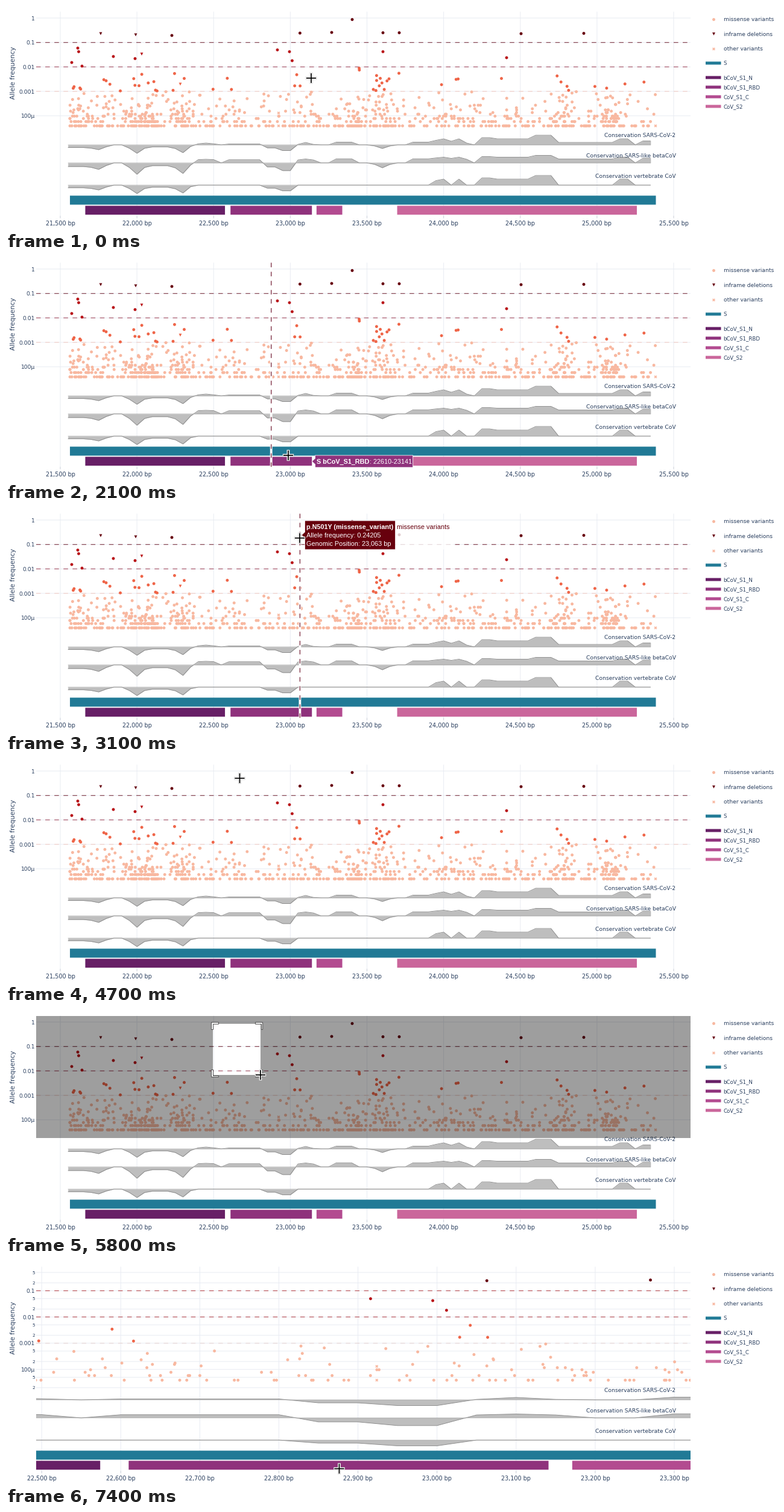
These frames come from a looping animation (1280 by 371 pixels, 8 s). A matplotlib script:

```python
import numpy as np
import matplotlib.pyplot as plt
from matplotlib.animation import FuncAnimation
from matplotlib.patches import PathPatch, Polygon, Rectangle
from matplotlib.path import Path

W, H, DPI = 1280, 371, 100
PT = 72 / DPI
LEFT, RIGHT, TOP, BOTTOM, FOOT = 50, 1135, 9.5, 212.5, 349
INK, GRID, TEAL = "#2a3f5f", "#e9ecf3", "#217a96"
DARK, RED, ORANGE, PALE = "#67000d", "#b91419", "#ef6548", "#f8b8a0"
UNIT = 1.937e-5  # frequency of a single observation


class View:
    """Maps base pairs and allele frequency to stage pixels."""

    def __init__(self, x0, bp0, scale, y1, decade):
        self.x0, self.bp0, self.scale = x0, bp0, scale
        self.y1, self.decade = y1, decade

    def x(self, bp):
        return self.x0 + (np.asarray(bp) - self.bp0) * self.scale

    def y(self, freq):
        return self.y1 - self.decade * np.log10(freq)

    def invert(self, pts):
        x, y = np.array(pts, float).T
        bp = self.bp0 + (x - self.x0) / self.scale
        return np.column_stack([bp, 10 ** ((self.y1 - y) / self.decade)])


WIDE = View(90, 21500, 0.25425, 20, 40.67)
NEAR = View(50, 22493, 1.311, 5.9, 43.6)

# ---------------------------------------------------------------- data
VARIANTS = {"N501T": (23064, .00167), "S494P": (23042, .0048),
            "E484K": (23012, .018), "N501Y": (23063, .24205)}
FREQUENT = WIDE.invert([
    (275, 49), (540, 44), (574, 22.5), (625, 44.5), (652, 44.5), (854, 46),
    (958, 45.5), (109, 94), (119, 70), (120.5, 76), (126, 100), (178, 84),
    (214, 87.5), (450, 73), (470, 76), (625, 76), (830, 86)])
DELETIONS = WIDE.invert([(157, 46), (215, 48), (225, 80), (289, 130)])
OTHERS = WIDE.invert([(452, 178), (452, 199.4), (830, 199.4), (1077, 199.4)])
HOT_SPOTS = WIDE.invert([(x, 0) for x in (117, 161, 218, 240, 293, 583, 622,
                                          928, 1000)])[:, 0]
GENE = (21563, 25384)
DOMAINS = [("bCoV_S1_N", 21663, 22574, "#671f66"),
           ("bCoV_S1_RBD", 22610, 23141, "#8f327c"),
           ("CoV_S1_C", 23171, 23339, "#b34b90"),
           ("CoV_S2", 23697, 25260, "#ca669b")]


def rare_variants(n=850):
    """Power-law counts, partly crowded around the hot spots."""
    rng = np.random.default_rng(11)
    counts = np.arange(2, 500)
    p = counts ** -1.7
    freq = UNIT * rng.choice(counts, n, p=p / p.sum())
    crowd = rng.choice(HOT_SPOTS, n) + rng.normal(0, 36, n)
    bp = np.where(rng.random(n) < .4, crowd, rng.uniform(*GENE, n))
    return np.column_stack([np.clip(bp, *GENE), freq])


MISSENSE = np.vstack([rare_variants(), FREQUENT, list(VARIANTS.values())])

# Flat-topped bumps in the shared profile: centre, half width, height
BUMPS = [(1, 2.5, -4.5), (4, 1.4, -8), (9, 1.4, -14), (12.5, 2.5, -3.5),
         (15, 1.2, -13), (18, 1.6, 3), (23, 3, 1.5), (26.5, 1.5, -5),
         (28.5, 1.5, -9.5), (31, 1.2, 4), (36, 2, 4.5), (41, 1.3, -6),
         (46.5, 2.5, 4.5), (49, 1.3, 10), (51, 1.3, 10), (54.5, 1.5, 12),
         (58, 3, 10), (62, 2, 16), (67.5, 4.5, 4), (72.5, 1.5, 10),
         (75.5, 1.5, 6.5)]
STEPS = np.arange(77)
PROFILE = sum(h * np.clip(w - abs(STEPS - c), 0, 1) for c, w, h in BUMPS)
TRACKS = [
    ("Conservation SARS-CoV-2", 214.5, 231, PROFILE),
    ("Conservation SARS-like betaCoV", 248.5, 261,
     np.where(PROFILE > .5, .5 * PROFILE + 4.5, 1.35 * PROFILE)),
    ("Conservation vertebrate CoV", 282.5, 298,
     np.where((PROFILE > 7) | ((PROFILE < 0) & (STEPS < 35)), PROFILE, 0)),
]

# ---------------------------------------------------------------- stage
fig = plt.figure(figsize=(W / DPI, H / DPI), dpi=DPI, facecolor="white")
ax = fig.add_axes([0, 0, 1, 1])
ax.set_xlim(0, W)
ax.set_ylim(H, 0)
ax.axis("off")
frame = Rectangle((LEFT, 0), RIGHT - LEFT, H, transform=ax.transData)


def text(x, y, s, size=9.2, z=5, **kw):
    kw = {"color": INK, "va": "center_baseline", "family": "DejaVu Sans", **kw}
    return ax.text(x, y, s, fontsize=size * PT, zorder=z, **kw)


def line(xs, ys, color, width=1.0, z=1, **kw):
    return ax.plot(xs, ys, color=color, lw=width * PT, zorder=z, snap=False,
                   solid_capstyle="butt", dash_capstyle="butt", **kw)[0]


def dashed(xs, ys, color, width, z):
    dash = 7.55 / width
    return line(xs, ys, color, width, z, ls=(0, (dash, dash)))


def rect(x0, y0, x1, y1, color, z=3, **kw):
    return ax.add_patch(Rectangle((x0, y0), x1 - x0, y1 - y0, fc=color, lw=0,
                                  zorder=z, snap=False, **kw))


def dots(x, y, colors, marker="o"):
    return ax.scatter(x, y, s=(4.9 * PT) ** 2, c=colors, marker=marker, lw=0,
                      zorder=4)


def shade(freq):
    return [DARK if f > .1 else RED if f > .01 else ORANGE if f > .001
            else PALE for f in freq]


def build(view, x_ticks, y_ticks, rules):
    """All artists of one zoom level."""
    art, labels = [], []
    for bp in x_ticks:
        x = view.x(bp)
        art.append(line([x, x], [TOP, FOOT], GRID))
        art.append(line([x, x], [FOOT, FOOT + 4], "#c9ced8"))
        labels.append(text(x, 361, f"{bp:,} bp", 9.6, ha="center"))
    for freq, name in y_ticks:
        y = view.y(freq)
        art.append(line([LEFT, RIGHT], [y, y], GRID))
        size = 7.4 if name in "25" else 9.2
        labels.append(text(48, y, name, size, ha="right"))
    for freq, color in zip((.1, .01, .001), rules):
        y = view.y(freq)
        art.append(dashed([LEFT, RIGHT], [y, y], color, 1.2, 2))

    x = view.x(21550 + 50 * STEPS)
    for _, _, base, heights in TRACKS:
        art.append(ax.fill_between(x, base, base - heights, color="#bebebe",
                                   lw=0, zorder=2))
        art.append(line(x, base - heights, "#8a8a8a", .9, 3))
        art.append(line(x[[0, -1]], [base, base], "#9a9a9a", .6, 3))
    a, b = view.x(GENE)
    art.append(rect(a, 315.5, b, 330.5, TEAL))
    for _, a, b, color in DOMAINS:
        art.append(rect(view.x(a), 332.4, view.x(b), 347.2, color))

    for pts, marker in ((MISSENSE, "o"), (DELETIONS, "v"), (OTHERS, "X")):
        bp, freq = pts.T
        art.append(dots(view.x(bp), view.y(freq), shade(freq), marker))
    for a in art:
        a.set_clip_path(frame)
    return art + labels


wide_ticks = [(10.0 ** -e, name) for e, name in
              enumerate(["1", "0.1", "0.01", "0.001", "100μ"])]
near_ticks = wide_ticks[1:] + [(m * 10.0 ** -e, str(m))
                               for e in range(1, 6) for m in (2, 5)]
wide_view = build(WIDE, range(21500, 25501, 500), wide_ticks,
                  ("#84424f", "#a8586a", "#f3d0c9"))
near_view = build(NEAR, range(22500, 23301, 100), near_ticks,
                  ("#b9545a", "#b9545a", "#e6d6d6"))

for name, y, _, _ in TRACKS:
    text(1110.5, y, name, ha="right")
text(12, 111, "Allele frequency", 10.8, rotation=90, ha="center", va="center")

for y, name, color, marker in [(21.5, "missense variants", PALE, "o"),
                               (46, "inframe deletions", DARK, "v"),
                               (70.5, "other variants", PALE, "X")]:
    dots([1173], [y], color, marker)
    text(1189.5, y, name)
for y, (name, *_, color) in zip((95, 119, 135, 151, 167),
                                [("S", TEAL)] + DOMAINS):
    rect(1160, y - 2.5, 1185.5, y + 2.5, color)
    text(1189.5, y, name, 8.7)


# ---------------------------------------------------------------- hover
def hover_text(x, y, s, color, bold=False):
    return text(x, y, s, 10.9, 23, color=color, family="Liberation Sans",
                weight="bold" if bold else "normal")


def width(t):
    return t.get_window_extent(fig.canvas.get_renderer()).width


def spike(x):
    return [line([x, x], [TOP, FOOT], "white", 3.8, 20),
            dashed([x, x], [TOP, FOOT], "#84384b", 1.4, 21)]


def balloon(tip, y, right, height, fill, edge):
    x, h = tip + 5.3, height / 2
    pts = [(tip, y), (x, y - 5), (x, y - h), (right, y - h), (right, y + h),
           (x, y + h), (x, y + 5)]
    return ax.add_patch(Polygon(pts, fc=fill, ec=edge, lw=.8 * PT, zorder=22))


def variant_hover(name):
    bp, freq = VARIANTS[name]
    x, y = WIDE.x(bp), WIDE.y(freq)
    fill = shade([freq])[0]
    ink = "#444444" if fill == ORANGE else "white"
    rows = [f"p.{name} (missense_variant)", f"Allele frequency: {freq:.5f}",
            f"Genomic Position: {bp:,} bp"]
    texts = [hover_text(x + 10.8, y + 14 * (i - 1), s, ink, i == 0)
             for i, s in enumerate(rows)]
    right = x + 14 + max(map(width, texts))
    side = hover_text(right + 2.8, y - 14, "missense variants", fill)
    haze = rect(right, y - 24, right + width(side) + 9, y + 24, "white", 22,
                alpha=.8)
    return spike(x) + texts + [
        side, haze, balloon(x + 2.7, y, right, 48, fill, ink)]


def bar_hover(name, a, b, y, color):
    tip = WIDE.x(b)
    bold = hover_text(tip + 8, y, name, "white", True)
    rest = hover_text(tip + 8 + width(bold), y, f": {a}-{b}", "white")
    right = tip + 10 + width(bold) + width(rest)
    return spike(WIDE.x((a + b) / 2)) + [
        bold, rest, balloon(tip, y, right, 20, color, "white")]


hovers = {name: variant_hover(name) for name in VARIANTS}
hovers["gene"] = bar_hover("S", *GENE, 323, TEAL)
hovers["rbd"] = bar_hover("S bCoV_S1_RBD", *DOMAINS[1][1:3], 340,
                          DOMAINS[1][3])
# (start, end, label), in ticks of 100 ms
HOVER_TIMES = [(11, 12, "gene"), (12, 22, "rbd"), (26, 28, "N501T"),
               (28, 29, "S494P"), (29, 30, "E484K"), (30, 44, "N501Y")]

# ---------------------------------------------------------------- drag box
veil = ax.add_patch(PathPatch(Path([(0, 0), (1, 1)]), fc="black", lw=0,
                              zorder=15))
corners = [ax.add_patch(Polygon([(0, 0)] * 3, fc="white", ec="#444444",
                                lw=.9 * PT, zorder=16)) for _ in range(4)]
DRAG_START, DRAG_END = 56, 74
CORNER = (343, 23)


def loop(x0, y0, x1, y1):
    return [(x0, y0), (x1, y0), (x1, y1), (x0, y1), (x0, y0)]


def draw_box(x, y, age):
    (l, t), r, b = CORNER, x, min(y, BOTTOM)
    ring = loop(LEFT, TOP, RIGHT, BOTTOM) + loop(l, t, r, b)[::-1]
    codes = [Path.MOVETO] + [Path.LINETO] * 3 + [Path.CLOSEPOLY]
    veil.set_path(Path(ring, codes * 2))
    # cubic fade-in over about 200 ms
    s = min(1, max(0, (age - .45) / 2))
    fade = 4 * s ** 3 if s < .5 else 1 - 4 * (1 - s) ** 3
    veil.set_alpha(.4 * fade)
    arm, o, w = min(9, (r - l) / 2, (b - t) / 2), .5, 2.8
    shape = np.array([(-w - o, arm), (-o, arm), (-o, -o), (arm, -o),
                      (arm, -w - o), (-w - o, -w - o)])
    ends = [(l, t, 1, 1), (r, t, -1, 1), (l, b, 1, -1), (r, b, -1, -1)]
    for c, (cx, cy, sx, sy) in zip(corners, ends):
        c.set_xy(shape * (sx, sy) + (cx, cy))


# ---------------------------------------------------------------- pointer
# Moves: start, end, goal x, goal y, ease-out power
MOVES = [(6, 12, 470, 334, 1.3), (20, 21, 468, 330, 1), (21, 31, 487, 50, 1),
         (43, 52, 343, 24, 2), (56, 58, 422, 108, 1), (58, 63, 542, 331, 1.8),
         (64, 65, 552.5, 345.5, 1)]

arms = [((-9, 9), (0, 0)), ((0, 0), (-9, 9))]
pointer = [(line([0], [0], color, w, z), s * np.array(dx), s * np.array(dy))
           for color, w, z, s in (("#c8c8c8", 5, 30, 1.03),
                                  ("white", 3.8, 31, .98),
                                  ("black", 1.7, 32, .9))
           for dx, dy in arms]


def pointer_at(i):
    pos = np.array([506.0, 120.0])
    for start, end, x, y, power in MOVES:
        t = min(1, max(0, (i - start) / (end - start)))
        pos += (np.array([x, y]) - pos) * (1 - (1 - t) ** power)
    return pos


def show(artists, on):
    for a in artists:
        a.set_visible(on)


def draw(i):
    x, y = pointer_at(i)
    for arm, dx, dy in pointer:
        arm.set_data(x + dx, y + dy)

    zoomed = i >= DRAG_END
    show(wide_view, not zoomed)
    show(near_view, zoomed)

    active = next((n for a, b, n in HOVER_TIMES if a <= i < b), None)
    for name, artists in hovers.items():
        show(artists, name == active)

    dragging = DRAG_START < i < DRAG_END
    show([veil, *corners], dragging)
    if dragging:
        draw_box(x, y, i - DRAG_START)
    return []


anim = FuncAnimation(fig, draw, frames=80, interval=100, init_func=lambda: [],
                     repeat=True)
plt.show()
```
